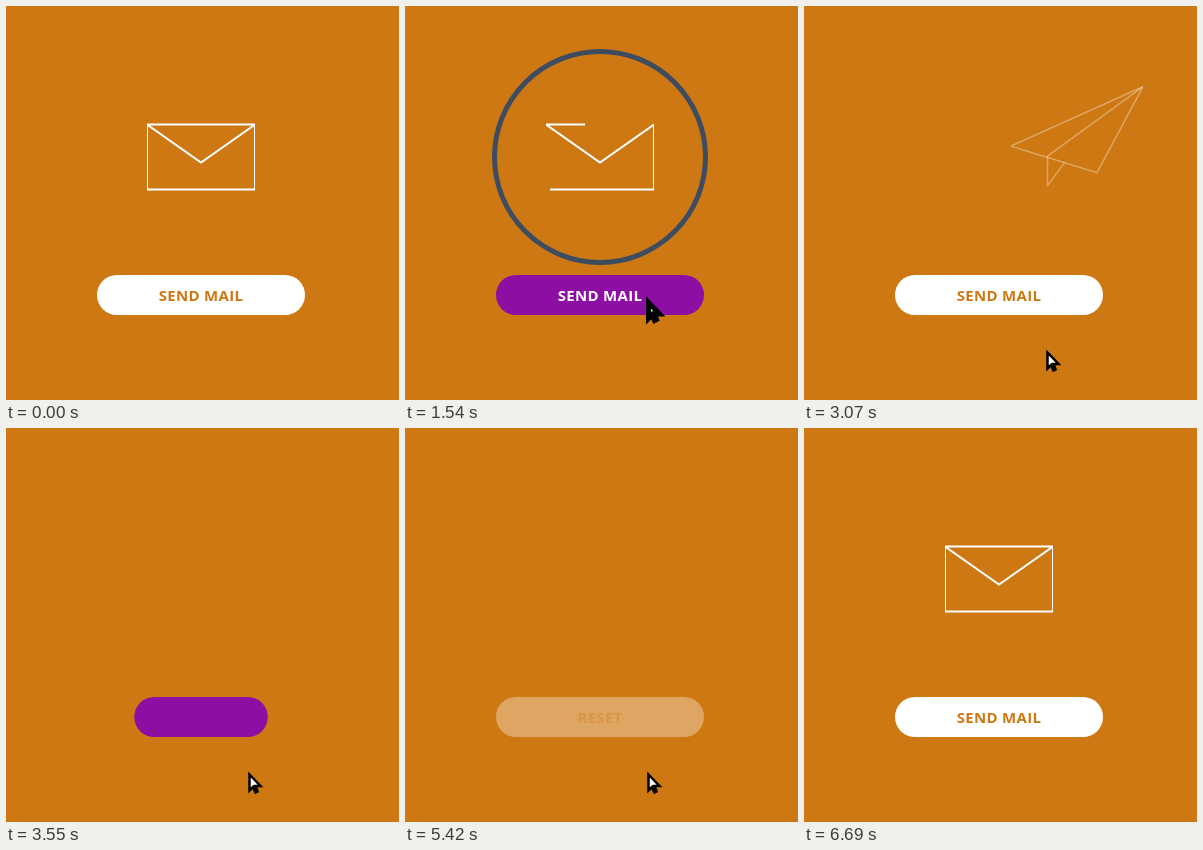
Recreate the animation shown at these times as an HTML page with a canvas. Size 393 px wide and 394 px high, loop 7.09 s.

```html
<!DOCTYPE html>
<html lang="en">
<head>
<meta charset="utf-8">
<title>Send mail button</title>
<style>
html, body { margin: 0; width: 100%; height: 100%; overflow: hidden; background: #ce7814; }
canvas { display: block; }
</style>
</head>
<body>
<canvas id="stage" width="393" height="394"></canvas>
<script>
// The picture advances in even beats; k is the current beat.
const LOOP = 7090, FIRST = 245, BEAT = 156.7;
const ORANGE = [206, 120, 20], PURPLE = [140, 14, 162], WHITE = [255, 255, 255];
const ctx = document.getElementById('stage').getContext('2d');

// 0 before beat a, 1 after beat b.
const ramp = (k, a, b) => Math.min(1, Math.max(0, (k - a) / (b - a)));
// Rises over a..b, falls over c..d.
const pulse = (k, a, b, c, d) => ramp(k, a, b) - ramp(k, c, d);
const easeOut = p => 1 - (1 - p) ** 2;

function mix(a, b, p) {
  return `rgb(${a.map((v, i) => Math.round(v + (b[i] - v) * p))})`;
}

function layer(alpha, draw) {
  ctx.save();
  ctx.globalAlpha = alpha;
  draw();
  ctx.restore();
}

function clip(x, y, w, h) {
  ctx.beginPath();
  ctx.rect(x, y, w, h);
  ctx.clip();
}

function strokeLines(width, ...paths) {
  ctx.strokeStyle = '#fff';
  ctx.lineWidth = width;
  for (const d of paths) ctx.stroke(new Path2D(d));
}

function disc(x, y, r) {
  ctx.beginPath();
  ctx.arc(x, y, r, 0, 2 * Math.PI);
}

function drawEnvelope(erased, alpha) {
  layer(alpha, () => {
    clip(141, 117, 108, 68);
    ctx.setLineDash([999, 999]);
    ctx.lineDashOffset = -erased;
    strokeLines(2, 'M141 118.5V183.5H249V118.5', 'M249 118.5H141L195 156.5L249 118.5');
  });
}

function drawPlane(k) {
  const shift = 90 * ramp(k, 16, 19) ** 2;
  layer(1 - ramp(k, 17, 20), () => {
    ctx.translate(shift, -shift * .41);
    clip(117, 117, 132, 100);
    ctx.setLineDash([75 * (k - 11), 999]);
    strokeLines(1.5, 'M249 117.5L117 177L203 203.5L249 117.5', 'M249 117.5L153.5 187V216.5L170.5 193.5');
  });
}

function drawRing(k) {
  disc(195, 151, 105.5 * ramp(k, 6, 9));
  ctx.strokeStyle = '#3e4c60';
  ctx.lineWidth = 5 * (1 - ramp(k, 9, 11));
  ctx.stroke();
}

function drawButton(k) {
  const reset = k >= 32 && k < 40;
  const hover = pulse(k, 2, 4, 11, 13) + pulse(k, 20, 21, 33, 34) + pulse(k, 36, 37, 40, 42);
  const alpha = reset ? pulse(k, 33, 36, 37.75, 39.75) : 1;
  const w = 208 - 164 * pulse(k, 21, 23.2, 26, 28);
  const h = 40 + 4 * pulse(k, 23, 24, 26, 27);
  layer(alpha, () => {
    ctx.beginPath();
    ctx.roundRect(195 - w / 2, 279 - h / 4, w, h, h / 2);
    ctx.fillStyle = mix(WHITE, PURPLE, hover);
    ctx.fill();
    ctx.globalAlpha = alpha * (1 - pulse(k, 20, 21, 33, 34));
    ctx.fillStyle = mix(ORANGE, WHITE, hover);
    ctx.font = 'bold 15px "Open Sans", sans-serif';
    ctx.letterSpacing = '.3px';
    ctx.textAlign = 'center';
    ctx.fillText(reset ? 'RESET' : 'SEND MAIL', 195, 295);
  });
}

function drawMouse(k) {
  const enter = easeOut(ramp(k, 1, 4)), rest = ramp(k, 10, 13);
  const back = ramp(k, 35, 37), leave = ramp(k, 39, 41);
  const pressed = k === 6 || k === 7 || k === 38;
  layer(1, () => {
    ctx.translate(304 - 61 * enter - 13 * back + 13 * leave,
      362 - 66 * enter + 50 * rest - 57 * back + 30 * leave);
    const arrow = new Path2D('M.5 .5V16.5L4 13L6.5 18.5L8.5 17.5L6.5 12H11.5Z');
    ctx.fillStyle = '#fff';
    ctx.fill(arrow);
    ctx.strokeStyle = '#000';
    ctx.stroke(arrow);
    if (pressed) {
      disc(0, 0, 12);
      ctx.fillStyle = 'rgba(255, 240, 0, .5)';
      ctx.fill();
    }
  });
}

function draw(k) {
  ctx.fillStyle = mix(ORANGE, ORANGE, 0);
  ctx.fillRect(0, 0, 393, 394);
  if (k >= 8 && k < 11) drawRing(k);
  if (k < 12) drawEnvelope(69 * Math.max(0, k - 8), 1);
  if (k > 11 && k < 20) drawPlane(k);
  if (k > 38) drawEnvelope(0, ramp(k, 38, 40));
  drawButton(k);
  if (k > 0 && k < 42) drawMouse(k);
}

function tick(now) {
  const t = now % LOOP;
  draw(Math.max(0, 1 + Math.floor((t - FIRST) / BEAT)));
  requestAnimationFrame(tick);
}
requestAnimationFrame(tick);
</script>
</body>
</html>
```
